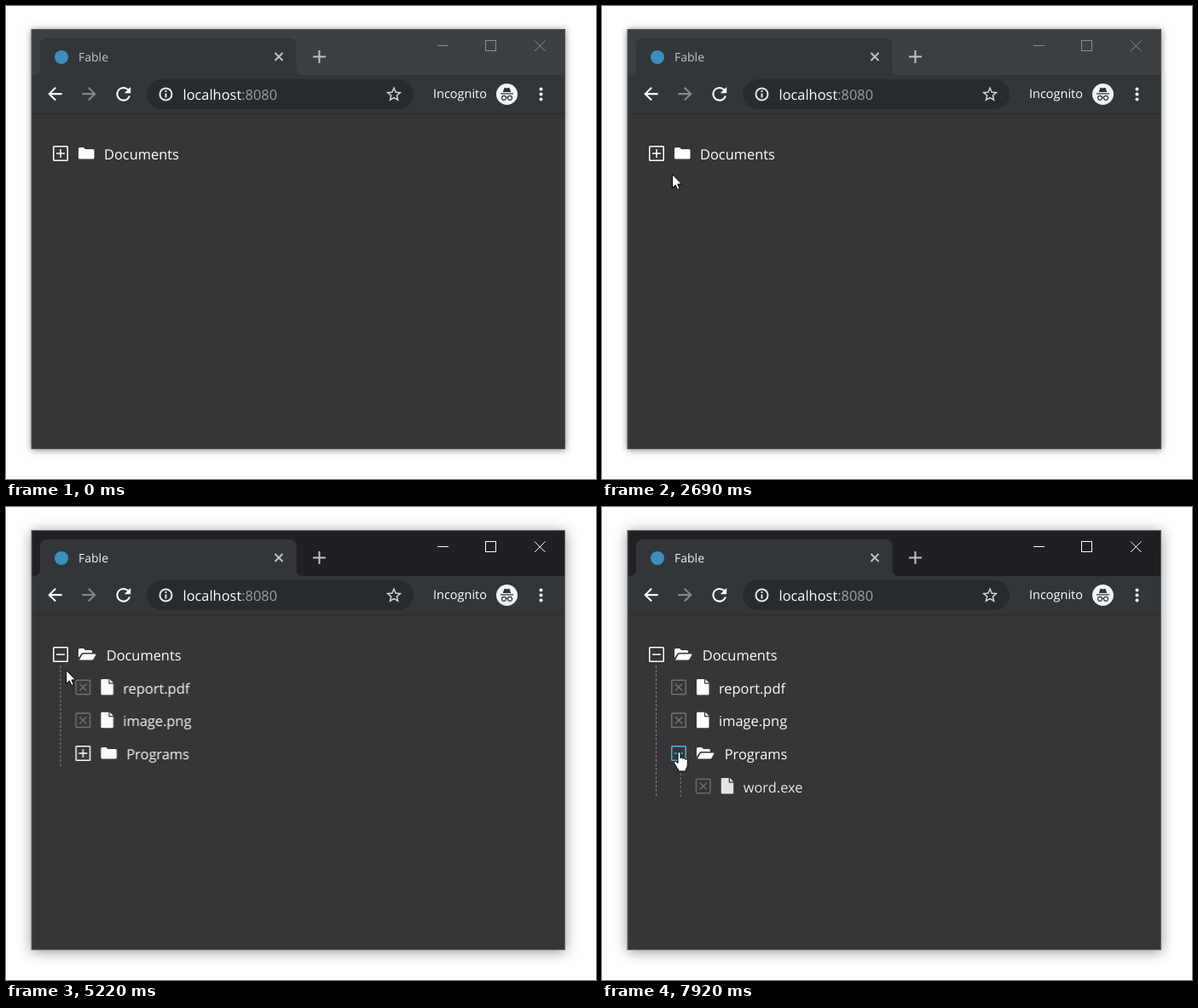
Animation, 692 px wide and 555 px high, one loop 8000 ms. Source, as an HTML page:

```html
<!DOCTYPE html>
<html lang="en">
<head>
<meta charset="utf-8">
<title>Tree view</title>
<style>
  html, body { margin: 0; width: 100%; height: 100%; overflow: hidden; background: #fff; }
  #shadow { position: absolute; left: 30px; top: 27px; width: 626px; height: 493px; box-shadow: 0 1px 8px rgba(0,0,0,.5); }
  #shadow.active { box-shadow: 0 2px 15px rgba(0,0,0,.42); }
  svg { position: absolute; left: 0; top: 0; display: block; }
  text { font-family: "Open Sans", "Noto Sans", sans-serif; font-size: 16.4px; fill: #fff; text-rendering: geometricPrecision; white-space: pre; }
  .line { fill: none; stroke: #fff; stroke-width: 1.5; }
  .hover { stroke: #4eb1e6; }
  .dash { stroke: #fff; stroke-opacity: .4; stroke-dasharray: 3 2; }
</style>
</head>
<body>
<div id="shadow"></div>
<svg id="stage" width="692" height="555" viewBox="0 0 692 555">
  <defs>
    <clipPath id="clip1"><rect id="cut1" x="30" y="186" width="626" height="0"/></clipPath>
    <clipPath id="clip2"><rect id="cut2" x="30" y="302" width="626" height="0"/></clipPath>
    <path id="arrow" d="M20 11H7.83l5.59-5.59L12 4l-8 8 8 8 1.41-1.41L7.83 13H20z"/>
  </defs>

  <!-- window -->
  <rect x="30" y="27" width="626" height="493" fill="#363636"/>
  <rect id="title" x="30" y="27" width="626" height="54"/>
  <path d="M30 81h2q8 0 8-8V46q0-8 8-8h284.500q8 0 8 8v27q0 8 8 8H656v45H30z" fill="#323639"/>
  <path d="M30 126.500H656" stroke="#282b2e"/>
  <rect id="edge" x="30" y="27.500" width="625.500" height="492" fill="none"/>

  <!-- tab -->
  <circle cx="65" cy="60" r="8" fill="#3b8fbd"/>
  <text id="tabName" x="85" y="65" style="font-size:14px">Fable</text>
  <path d="M315.500 55l9 9m0-9l-9 9" stroke="#bfc3c7" stroke-width="2"/>
  <path d="M360 59.500h15m-7.500-7.500v15" stroke="#bfc3c7" stroke-width="2"/>
  <g id="buttons" fill="none">
    <path d="M506 46.500h13"/>
    <rect x="562.500" y="40.500" width="12" height="12"/>
    <path d="M620 40.500l12.500 12.500m0-12.500l-12.500 12.500"/>
  </g>

  <!-- toolbar -->
  <use href="#arrow" transform="translate(45.200 90.900) scale(1.02)" fill="#fff"/>
  <use href="#arrow" transform="translate(109.700 90.900) scale(-1.02 1.02)" fill="#85898c"/>
  <path transform="translate(125.200 90.700) scale(1.05)" fill="#fff" d="M17.65 6.350C16.200 4.900 14.210 4 12 4c-4.420 0-7.990 3.580-7.990 8s3.570 8 7.990 8c3.730 0 6.840-2.550 7.730-6h-2.080c-.82 2.330-3.040 4-5.650 4-3.310 0-6-2.690-6-6s2.690-6 6-6c1.660 0 3.140.69 4.220 1.780L13 11h7V4z"/>
  <rect x="165" y="86" width="313" height="35" rx="17.500" fill="#282b2e"/>
  <g stroke="#e4e6e8" stroke-width="2" fill="none">
    <circle cx="187.500" cy="103.500" r="7"/>
    <path d="M187.500 102.500v5m0-8.500v2"/>
  </g>
  <text x="207.500" y="109.500">localhost<tspan fill="#9aa0a5">:8080</tspan></text>
  <path transform="translate(444 92.500) scale(.92)" fill="#d5d8db" d="M22 9.240l-7.190-.62L12 2 9.190 8.630 2 9.240l5.460 4.730L5.820 21 12 17.270 18.180 21l-1.630-7.030zM12 15.400l-3.760 2.270 1-4.280-3.320-2.880 4.380-.38L12 6.100l1.710 4.040 4.380.38-3.320 2.880 1 4.280z"/>
  <text x="501" y="108" style="font-size:14.500px">Incognito</text>
  <circle cx="587.500" cy="103.500" r="12.500" fill="#f1f3f4"/>
  <path d="M580 102.200h15v1.300h-15zM582.700 101l1.600-4.500q.5-1 1.500-.5l1.700.5 1.700-.5q1-.5 1.500.5l1.600 4.500z" fill="#303438"/>
  <g fill="none" stroke="#303438" stroke-width="1.200">
    <circle cx="584" cy="107.800" r="2.500"/>
    <circle cx="591" cy="107.800" r="2.500"/>
    <path d="M586.500 107.500q1-.7 2 0"/>
  </g>
  <g fill="#fff"><circle cx="627.500" cy="97.500" r="2"/><circle cx="627.500" cy="103.500" r="2"/><circle cx="627.500" cy="109.500" r="2"/></g>

  <!-- tree -->
  <g id="root"></g>
  <g clip-path="url(#clip1)">
    <g id="level1">
      <path class="dash" d="M63.500 186V350"/>
      <g id="rows1"></g>
      <g clip-path="url(#clip2)">
        <g id="level2">
          <path class="dash" d="M89.500 302V350"/>
          <g id="rows2"></g>
        </g>
      </g>
    </g>
  </g>

  <!-- pointer -->
  <g id="pointer" fill="#fff" stroke="#000" stroke-linejoin="round">
    <path id="tip" d="M.5.5V16.500L4.200 13l2.500 5.500 2.500-1.100L6.800 12H11.500z"/>
    <path id="hand" d="M-1.500 13V1.500Q-1.300 0 0 0T1.500 1.500V7.500Q1.700 6.200 3 6.300T4.400 8Q4.800 7 6 7.200T7.200 9Q7.800 8 8.800 8.300T9.800 10V15Q9.800 18 8 20V22.500H-1V20.500Q-2.500 19-3.700 16.500L-5.700 13.500Q-6.500 11.800-5 11.200T-2.700 12z"/>
  </g>
</svg>
<script>
const LOOP = 8000, FOCUS = 3790;
const $ = id => document.getElementById(id);
const show = (el, on) => el.setAttribute('visibility', on ? 'visible' : 'hidden');

const BOX = '<rect x="-8.250" y="-8.250" width="16.500" height="16.500" rx=".8"/>';
const toggle = d => `<g class="line">${BOX}<path d="${d}"/></g>`;
const label = (x, name) => `<text x="${x}" y="7">${name}</text>`;
const CLOSED = '<path fill="#fff" d="M21-5.500q0-1.500 1.500-1.500h4.500l2 2h9q1.500 0 1.500 1.500v8.500q0 1.500-1.500 1.500h-15.500q-1.500 0-1.500-1.500z"/>';
const OPEN = '<path fill="#fff" d="M21 4V-5.500q0-1.500 1.500-1.500h4.500l2 2h6.500q1.500 0 1.500 1.500v1.500h-10.500q-1.500 0-2.200 1.200zM22 6.500l3.300-6q.6-1.100 1.800-1.100h13.500q1.300 0 .7 1.200l-2.700 4.900q-.6 1-1.800 1z"/>';
const FILE = '<path fill="#fff" d="M22.200-9.500h7.800v5.500h5.500v11.800q0 1.200-1.200 1.200h-12.100q-1.200 0-1.200-1.200v-16.100q0-1.200 1.200-1.200zM31.200-9.500l4.300 4.300h-4.300z"/>';

const at = (x, y, inner) => `<g transform="translate(${x} ${y})">${inner}</g>`;
const file = (x, y, name) => at(x, y,
  `<g opacity=".3">${toggle('M-4-4L4 4M4-4L-4 4')}</g>${FILE}${label(47, name)}`);
const folder = (x, y, name, id) => at(x, y,
  `<g id="${id}Closed">${toggle('M-5 0H5M0-5V5')}${CLOSED}${label(51, name)}</g>` +
  `<g id="${id}Open">${toggle('M-5 0H5')}${OPEN}${label(53.700, name)}</g>`);

$('root').innerHTML = folder(64, 173, 'Documents', 'docs');
$('rows1').innerHTML = file(90, 211.500, 'report.pdf') + file(90, 250.200, 'image.png') +
  folder(90, 289, 'Programs', 'progs');
$('rows2').innerHTML = file(116, 327.500, 'word.exe');

// pointer path: time, x, y
const PATH = [
  [190, 573, 540], [970, 374, 420], [1390, 203, 340], [1490, 203, 340],
  [1780, 132, 273], [2590, 83, 199], [2690, 82, 197], [2790, 82, 197],
  [3480, 69, 174.500], [3550, 68, 173], [4950, 68, 173], [5450, 72, 206],
  [6160, 90, 266], [6260, 90, 266], [6960, 90.500, 287.500]
];

function pointerAt(t) {
  const i = PATH.findIndex(k => k[0] > t);
  if (i < 0) return PATH[PATH.length - 1].slice(1);
  if (i === 0) return PATH[0].slice(1);
  const [t0, x0, y0] = PATH[i - 1], [t1, x1, y1] = PATH[i];
  const u = (t - t0) / (t1 - t0);
  return [x0 + (x1 - x0) * u, y0 + (y1 - y0) * u];
}

// critically damped spring from 0 to 1
function spring(ms) {
  const x = Math.max(0, ms) * 0.0047;
  return 1 - (1 + x) * Math.exp(-x);
}

// time with a pause of 100 ms at the given moment
const pause = (t, when) => t < when ? t : Math.max(when, t - 100);

function setFolder(id, open, over) {
  show($(id + 'Closed'), !open);
  show($(id + 'Open'), open);
  for (const part of ['Closed', 'Open'])
    $(id + part).querySelector('.line').classList.toggle('hover', over);
}

function setLevel(id, p) {
  $(id).setAttribute('opacity', p);
  $(id).setAttribute('transform', `translate(${22 * (1 - p)} 0)`);
}

function draw(t) {
  const active = t >= FOCUS;
  $('shadow').classList.toggle('active', active);
  $('title').setAttribute('fill', active ? '#202024' : '#3c4043');
  $('edge').setAttribute('stroke', active ? '#66686a' : '#505254');
  $('buttons').setAttribute('stroke', active ? '#fff' : '#8b8e90');
  $('tabName').style.fill = active ? '#f1f3f4' : '#c2c6c9';

  const [x, y] = pointerAt(t);
  const inside = (cx, cy) => Math.abs(x - cx) < 9 && Math.abs(y - cy) < 9;
  const overDocs = inside(64, 173), overProgs = inside(90, 289);
  const docsOpen = t >= FOCUS + 90, progsOpen = t >= 7140;
  setFolder('docs', docsOpen, overDocs);
  setFolder('progs', progsOpen, overProgs);

  const p1 = docsOpen ? spring(pause(t, 4570) - 3830) : 0;
  const p2 = progsOpen ? spring(Math.min(t, 7920) - 7150) : 0;
  setLevel('level1', p1);
  setLevel('level2', p2);
  $('cut1').setAttribute('height', 4.5 + 116 * p1 + 38.5 * p2);
  $('cut2').setAttribute('height', 4.5 + 38.5 * p2);

  const hand = overDocs || overProgs, seen = t >= 190;
  $('pointer').setAttribute('transform', `translate(${x} ${y})`);
  show($('tip'), seen && !hand);
  show($('hand'), seen && hand);
}

const start = performance.now();
function tick() {
  draw((performance.now() - start) % LOOP);
  requestAnimationFrame(tick);
}
tick();
</script>
</body>
</html>
```
